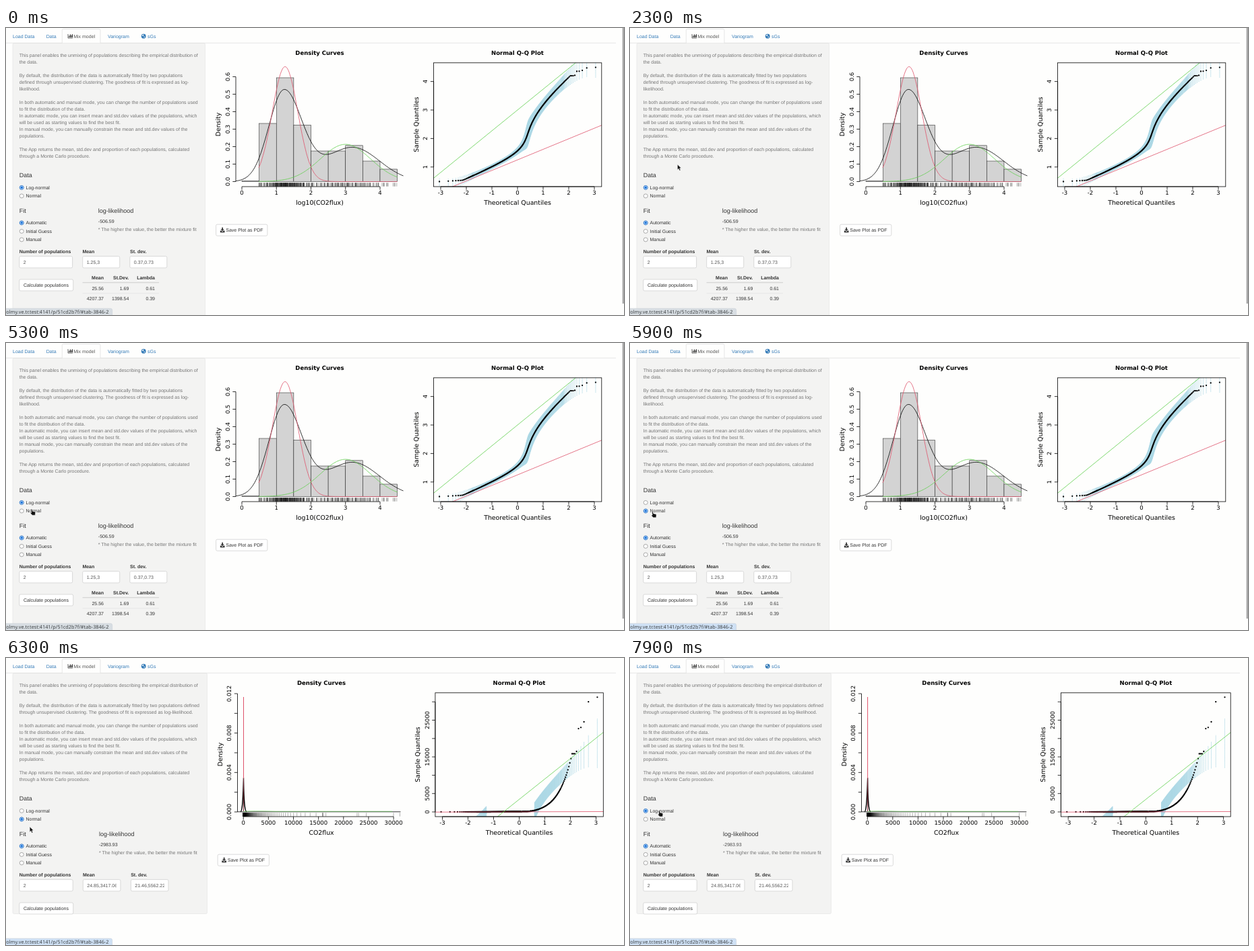
These frames come from a looping animation (917x427 px, 8000 ms). An HTML page:

```html
<!DOCTYPE html>
<html lang="en">
<head>
<meta charset="utf-8">
<title>Mix model</title>
<style>
html, body { margin: 0; width: 100%; height: 100%; overflow: hidden; background: #fefefd; }
svg { display: block; width: 100%; height: 100%; }
text { font: 7px "Liberation Sans", Arial, sans-serif; fill: #333; text-rendering: geometricPrecision; white-space: pre; }
.help { fill: #757575; }
.link { fill: #337ab7; }
.val { fill: #555; }
.head { font-size: 9px; }
.bold { font-weight: bold; }
.end { text-anchor: end; }
.tick, .name, .title { font-family: "DejaVu Sans", sans-serif; font-size: 8.5px; fill: #000; text-anchor: middle; }
.name { font-size: 9.35px; }
.title { font-weight: bold; }
.url { font: 7.3px "Noto Sans", "Open Sans", sans-serif; fill: #3c4043; }
.box { fill: #fff; stroke: #ccc; stroke-width: .7; }
.ln { fill: none; stroke: #000; stroke-width: .8; }
.red { stroke: #df536b; }
.green { stroke: #61d04f; }
</style>
</head>
<body>
<svg id="stage" viewBox="0 0 917 427"></svg>
<script>
const text = (x, y, s, cls = '', more = '') =>
  `<text x="${x}" y="${y}" class="${cls}" ${more}>${s}</text>`;
const turned = (x, y, s, cls) => text(x, y, s, cls, `transform="rotate(-90 ${x} ${y})"`);
const rect = (x, y, w, h, more = '') =>
  `<rect x="${x}" y="${y}" width="${w}" height="${h}" ${more}/>`;
const path = (d, cls = 'ln', more = '') => `<path d="${d}" class="${cls}" ${more}/>`;
const range = (n, f) => Array.from({ length: n }, (_, i) => f(i));

/* ---------- statistics ---------- */
const bell = z => Math.exp(-z * z / 2) / Math.sqrt(2 * Math.PI);
const cdf = z => {
  const t = 1 / (1 + .2316419 * Math.abs(z));
  const p = bell(z) * t * (.31938153 + t * (-.356563782 + t * (1.781477937 + t * (-1.821255978 + t * 1.330274429))));
  return z > 0 ? 1 - p : p;
};
const solve = (f, p, lo, hi) => {
  for (let k = 0; k < 50; k++) {
    const mid = (lo + hi) / 2;
    if (f(mid) < p) lo = mid; else hi = mid;
  }
  return lo;
};
const sum = (mix, f) => mix.reduce((s, m) => s + f(...m), 0);
const mixCdf = mix => x => sum(mix, (w, m, s) => w * cdf((x - m) / s));
const mixPdf = mix => x => sum(mix, (w, m, s) => w * bell((x - m) / s) / s);

let seed = 11;
const rand = () => (seed = seed * 16807 % 2147483647) / 2147483647;

const N = 437;
const logMix = [[.61, 1.25, .37], [.39, 3, .73]];
const rawMix = [[.62, 24.85, 21.46], [.38, 3417, 5562]];
const topValues = [4.217, 4.356, 4.362, 4.39, 4.477, 4.495];

const fitted = (mix, p, lo, hi) => {
  const q = solve(mixCdf(mix), p, lo, hi);
  return { q, d: 2.6 * Math.sqrt(p * (1 - p) / N) / mixPdf(mix)(q) };
};
const sample = range(N, i => {
  const p = (i + .5) / N, z = solve(cdf, p, -4, 4);
  const log = fitted(logMix, p, -2, 7), raw = fitted(rawMix, p, -3e4, 5e4);
  const k = i - N + topValues.length;
  const v = k >= 0 ? topValues[k] : Math.min(4.2, Math.max(log.q, .49 + .05 * (z + 3)));
  return { z, v, log, raw, jit: rand() - .5 };
});

/* ---------- plots ---------- */
const xAxis = (ticks, y = 236) =>
  path(`M${ticks[0][0]} ${y}H${ticks[ticks.length - 1][0]}` + ticks.map(t => `M${t[0]} ${y}v4.7`).join('')) +
  ticks.map(t => text(t[0], 247.9, t[1], 'tick')).join('');
const yAxis = (x, ticks) =>
  path(`M${x} ${ticks[0][0]}V${ticks[ticks.length - 1][0]}` + ticks.map(t => `M${x} ${t[0]}h-4.7`).join('')) +
  ticks.map(t => turned(x - 9.2, t[0], t[1], 'tick')).join('');
const curve = (f, a, b, cls) =>
  path('M' + range(161, i => {
    const x = a + (b - a) * i / 160;
    return x.toFixed(1) + ' ' + f(x).toFixed(2);
  }).join('L'), cls);
const rug = (xs, alpha) =>
  path(xs.map(x => `M${x.toFixed(1)} 230.3v5.4`).join(''), 'ln', `stroke-opacity="${alpha}" style="stroke-width:.5"`);

function logDensity() {
  const X = v => 350 + 51.25 * v, Y = d => 228.5 - 260 * d;
  const tops = [227.2, 142, 74, 144.5, 183, 183, 174.8, 198, 210];
  const part = ([w, m, s]) => x => Y(w * bell(((x - 350) / 51.25 - m) / s) / s);
  const kernel = x => {
    const v = (x - 350) / 51.25, a = (v - 1.22) / (v < 1.22 ? .44 : .52), b = (v - 3.2) / .78;
    return 228.5 - 135 * Math.exp(-a * a / 2) - 51 * Math.exp(-b * b / 2);
  };
  return text(465.5, 40.2, 'Density Curves', 'title') +
    text(465.5, 262.6, 'log10(CO2flux)', 'name') + turned(318, 143.5, 'Density', 'name') +
    tops.map((y, i) => rect(X(i / 2), y, 25.62, 228.5 - y, 'fill="#d3d3d3" stroke="#222" stroke-width=".55"')).join('') +
    rug(sample.map(s => Math.min(580, Math.max(375.5, X(s.v + s.jit * .12)))), .55) +
    curve(kernel, 341, 589.5, 'ln') +
    curve(part(logMix[0]), 375, 580.5, 'ln red') +
    curve(part(logMix[1]), 375, 580.5, 'ln green') +
    xAxis(range(5, i => [X(i), i])) +
    yAxis(341, range(7, i => [Y(i / 10), (i / 10).toFixed(1)]));
}

function rawDensity(x0, step, right) {
  const X = v => x0 + step * v / 5000, mid = (x0 + right) / 2 - .8;
  return text(mid, 40.2, 'Density Curves', 'title') +
    text(mid, 262.6, 'CO2flux', 'name') + turned(320.5, 143.5, 'Density', 'name') +
    rug(sample.map(s => X(10 ** s.v)), .6) +
    path(`M343.5 228.8H${right}`) +
    path(`M348 228.8C351.3 228 351.6 205 ${x0 + .3} 178C353 205 353.2 228 357 228.8`, 'ln', 'style="stroke-width:1.3"') +
    path(`M${x0} 228.4Q365 227 400 228.2H${right - 12}`, 'ln green', 'style="stroke-width:.6"') +
    path(`M${x0 + .3} 228V58`, 'ln red', 'style="stroke-width:1"') +
    path(`M${x0 + .3} 228V179`, 'ln', 'stroke-opacity=".55"') +
    xAxis(range(7, i => [X(5000 * i), 5000 * i])) +
    yAxis(343.5, range(7, i => [229 - 29.33 * i, i % 2 ? '' : (i * .002).toFixed(3)]));
}

function qqPlot(o) {
  const X = z => o.x0 + o.sx * z, Y = v => o.y0 - o.sy * v;
  const strip = s => {
    const { q, d } = s[o.key];
    return `M${X(s.z).toFixed(2)} ${Y(q - d).toFixed(1)}V${Y(q + d).toFixed(1)}`;
  };
  const band = (test, more) =>
    path(sample.filter(test).map(strip).join(''), 'ln', `style="stroke:#add8e6;stroke-width:.9" ${more}`);
  const line = ([, m, s], cls) => path(`M${X(-4)} ${Y(m - 4 * s)}L${X(4)} ${Y(m + 4 * s)}`, 'ln ' + cls);
  const dots = sample.map(s => `M${X(s.z).toFixed(2)} ${Y(o.value(s)).toFixed(1)}h.01`).join('');
  const id = 'clip' + o.left;
  return `<clipPath id="${id}">${rect(o.left, 51.8, o.right - o.left, 184.2)}</clipPath>` +
    `<g clip-path="url(#${id})">` +
    band(s => Math.abs(s.z) < 1.9, '') + band(s => Math.abs(s.z) >= 1.9, 'stroke-dasharray="1.3 .6"') +
    path(dots, 'ln', 'stroke-linecap="round" style="stroke-width:2.3"') +
    line(o.mix[0], 'red') + line(o.mix[1], 'green') + '</g>' +
    rect(o.left, 51.8, o.right - o.left, 184.2, 'class="ln"') +
    xAxis(range(7, i => [X(i - 3), i - 3])) + yAxis(o.left, o.ticks.map(([v, s]) => [Y(v), s])) +
    text(o.x0, 40.2, 'Normal Q-Q Plot', 'title') + text(o.x0, 262.6, 'Theoretical Quantiles', 'name') +
    turned(o.left - 23, 143.5, 'Sample Quantiles', 'name');
}
const rawQq = (x0, sx, left, right) => qqPlot({
  x0, sx, left, right, y0: 229, sy: 136.5 / 25000, key: 'raw', mix: rawMix, value: s => 10 ** s.v,
  ticks: range(7, i => [5000 * i, i % 2 || !i ? 5000 * i : ''])
});

/* ---------- form ---------- */
const radio = (y, label, key) =>
  `<circle cx="23.2" cy="${y}" r="3" fill="#fff" stroke="#767676" stroke-width=".6"/>` +
  `<g class="${key}"><circle cx="23.2" cy="${y}" r="2.9" fill="#fff" stroke="#1a73d8" stroke-width=".9"/>` +
  `<circle cx="23.2" cy="${y}" r="1.8" fill="#1a73d8"/></g>` + text(29.5, y + 2.5, label);
const field = (x, y, w, value, id) =>
  rect(x, y, w, 17.3, 'rx="2" class="box"') +
  `<clipPath id="${id}">${rect(x, y, w - 6, 17)}</clipPath>` +
  text(x + 6, y + 11.2, value, 'val', `clip-path="url(#${id})"`);

const intro = [
  'This panel enables the unmixing of populations describing the empirical distribution of', 'the data.', ''];
const logFit = ['By default, the distribution of the data is automatically fitted by two populations',
  'defined through unsupervised clustering. The goodness of fit is expressed as log-', 'likelihood.'];
const rawFit = ['By default, the distribution of the data is automatically fitted by two populations defined',
  'through unsupervised clustering. The goodness of fit is expressed as log-likelihood.'];
const rest = ['', 'In both automatic and manual mode, you can change the number of populations used',
  'to fit the distribution of the data.',
  'In automatic mode, you can insert mean and std.dev values of the populations, which',
  'will be used as starting values to find the best fit.',
  'In manual mode, you can manually constrain the mean and std.dev values of the',
  'populations.', '',
  'The App returns the mean, std.dev and proportion of each populations, calculated',
  'through a Monte Carlo procedure.'];

function form(raw) {
  const up = raw ? 10 : 0, dx = raw ? 1.2 : 0, k = raw ? 'r' : 'l';
  const y = v => v - up;
  const row = (v, cells, cls) => cells.map((s, i) => text([145, 182.3, 221][i], v, s, 'end ' + cls)).join('');
  const table = row(374, ['Mean', 'St.Dev.', 'Lambda'], 'bold') +
    row(389.7, ['25.56', '1.69', '0.61'], '') + row(405.3, ['4207.37', '1398.54', '0.39'], '') +
    path('M113.5 378.8H227', 'ln', 'style="stroke:#ccc;stroke-width:1"') +
    path('M113.5 394.7H227', 'ln', 'style="stroke:#ddd;stroke-width:.6"');
  const save = raw ? 2.5 : 0;
  return rect(10, 22.5, raw ? 288.5 : 285.5, raw ? 358 : 420, 'rx="2" fill="#f3f3f2" stroke="#e3e3e3" stroke-width=".6"') +
    [...intro, ...(raw ? rawFit : logFit), ...rest].map((s, i) => text(19.7, 42.5 + 10 * i, s, 'help')).join('') +
    text(19.7, y(222), 'Data', 'head') + radio(y(237.4), 'Log-normal', 'log') + radio(y(249.9), 'Normal', 'nor') +
    text(19.7, y(274.8), 'Fit', 'head') + radio(y(289.9), 'Automatic', '') +
    [[302.4, 'Initial Guess'], [314.9, 'Manual']].map(r => radio(y(r[0]), r[1], 'off')).join('') +
    text(136.8 + dx, y(274.8), 'log-likelihood', 'head') +
    text(136.8 + dx, y(290), raw ? '-2983.93' : '-506.59', raw ? 'score' : '') +
    text(136.8 + dx, y(302.4), '* The higher the value, the better the mixture fit', 'help') +
    text(19.7, y(334.6), 'Number of populations', 'bold') + text(113.4 + dx / 2, y(334.6), 'Mean', 'bold') +
    text(184 + dx, y(334.6), 'St. dev.', 'bold') +
    field(19.8, y(339.6), 78.8 + dx / 2, '2', k + 1) +
    field(113.7 + dx / 2, y(339.6), 55 + dx / 2, raw ? '24.85,3417.06' : '1.25,3', k + 2) +
    field(183.8 + dx * 1.3, y(339.6), 55 + dx / 2, raw ? '21.46,5562.22' : '0.37,0.73', k + 3) +
    rect(19.7, y(374), 80, 17, 'rx="2" class="box"') + text(26, y(385), 'Calculate populations') +
    (raw ? '' : table) +
    `<g transform="translate(${save})">` + rect(311.6, 292.2, 76.3, 17, 'rx="2" class="box"') +
    path('M320.3 296.8h1.7v2.8h1.8l-2.7 2.7l-2.7-2.7h1.9zM317.8 301.6h1.5l1.8 1.6l1.8-1.6h1.6v2.6h-6.7z', '', 'fill="#333"') +
    text(326.3, 303, 'Save Plot as PDF') + '</g>';
}

const nav = path('M0 22.3H83.3V3.5q0-2 2-2H138q2 0 2 2V22.3H905', 'ln', 'style="stroke:#ddd;stroke-width:.7;fill:none"') +
  text(10, 14.6, 'Load Data', 'link') + text(59.8, 14.6, 'Data', 'link') +
  path('M92 9v6h7', 'ln', 'style="stroke:#444"') +
  path('M93.8 14V11.6M95.4 14V9.6M97 14V10.8M98.4 14V9.2', 'ln', 'style="stroke:#333;stroke-width:1.1"') +
  text(100.2, 14.6, 'Mix model', 'val') + text(151, 14.6, 'Variogram', 'link') +
  '<circle cx="204.2" cy="12.2" r="3.4" fill="#337ab7"/>' +
  path('M202 10.2l2-.7l.8 1.3l-1.6 1.5l-1.4-.6zM204.6 12.4l1.8.3l-.8 1.9l-1.2-.9z', '', 'fill="#d5e4f1"') +
  text(210, 14.6, 'sGs', 'link');

const arrow = path('M0 0V7.9L1.8 6.3L3.1 9.3L4.6 8.6L3.3 5.8L5.6 5.6Z', '', 'fill="#111" stroke="#fff" stroke-width=".5"');
const hand = path('M0 .6Q.8-.5 1.6.5L2.2 3.2L5.6 4Q6.8 4.3 6.6 5.6L6.3 9.2H2L-.6 6.4Q-.9 5.4.7 5.5Z', '',
  'fill="#111" stroke="#fff" stroke-width=".5"');

const group = (id, body) => `<g id="${id}">${body}</g>`;
const $ = id => document.getElementById(id);

$('stage').innerHTML = rect(0, 0, 917, 427, 'fill="#fefefd"') +
  group('logView', form(false) + rect(914.6, 0, 2.4, 410, 'fill="#a9a9a9"') +
    group('logPlots', logDensity() + qqPlot({
      x0: 759, sx: 38, left: 634.6, right: 883.8, y0: 249.2, sy: 42.4, key: 'log', mix: logMix,
      value: s => s.v, ticks: range(4, i => [i + 1, i + 1])
    }))) +
  group('rawView', form(true) +
    group('narrow', rawDensity(352.2, 37.15, 585.5) + rawQq(761.5, 38, 636.9, 886.3)) +
    group('wide', rawDensity(352.3, 37.55, 588.3) + rawQq(765.4, 38.4, 639.4, 891.2))) +
  nav +
  path('M-2 417.2H155q2.6 0 2.6 2.6V429H-2z', '', 'id="bar" stroke="#c3cad2" stroke-width=".5"') +
  text(.3, 425.2, 'olmy.ve.tr.test:4141/p/51cd2b7f/#tab-3846-2', 'url') +
  group('cursor', group('arrow', arrow) + group('hand', hand));

document.querySelectorAll('.off').forEach(e => e.remove());

/* ---------- timeline: start, x, y, shape ---------- */
const moves = [
  [0, 0, 0, ''],
  [500, 48, 1, 'arrow'], [700, 52, 32, 'arrow'], [900, 58, 74, 'arrow'],
  [1100, 65, 114, 'arrow'], [1300, 70, 148, 'arrow'], [1500, 72, 167.5, 'arrow'],
  [1700, 71.5, 178, 'arrow'], [1900, 70, 191, 'arrow'], [2100, 69.5, 199, 'arrow'], [2300, 70.4, 203, 'arrow'],
  [2700, 73, 200, 'arrow'], [2900, 75.5, 197.2, 'arrow'],
  [4700, 69, 206, 'arrow'], [4900, 58, 221, 'arrow'], [5100, 46, 237, 'arrow'],
  [5300, 37, 247, 'hand'], [5500, 32.5, 250.5, 'hand'],
  [6100, 35.2, 249.2, 'hand'], [6300, 35.2, 251, 'arrow'], [7300, 42.2, 226.8, 'hand']
];
const show = (id, on) => { $(id).style.display = on ? '' : 'none'; };
const mark = (cls, on) => document.querySelectorAll('.' + cls).forEach(e => { e.style.display = on ? '' : 'none'; });

function draw(now) {
  const t = now % 8000;
  const [, x, y, shape] = moves.filter(m => m[0] <= t).pop();
  $('cursor').setAttribute('transform', `translate(${x} ${y})`);
  show('arrow', shape === 'arrow');
  show('hand', shape === 'hand');
  show('logView', t < 6300);
  show('rawView', t >= 6300);
  show('narrow', t < 6700);
  show('wide', t >= 6700);
  const log = t < 5700 || t >= 7300;
  mark('log', log);
  mark('nor', !log);
  $('logPlots').style.opacity = t >= 6100 ? .58 : 1;
  document.querySelector('.score').style.opacity = t >= 7900 ? .88 : 1;
  $('bar').setAttribute('fill', t < 5500 ? '#d8dee3' : '#cfe1f5');
  requestAnimationFrame(draw);
}
draw(0);
</script>
</body>
</html>
```
